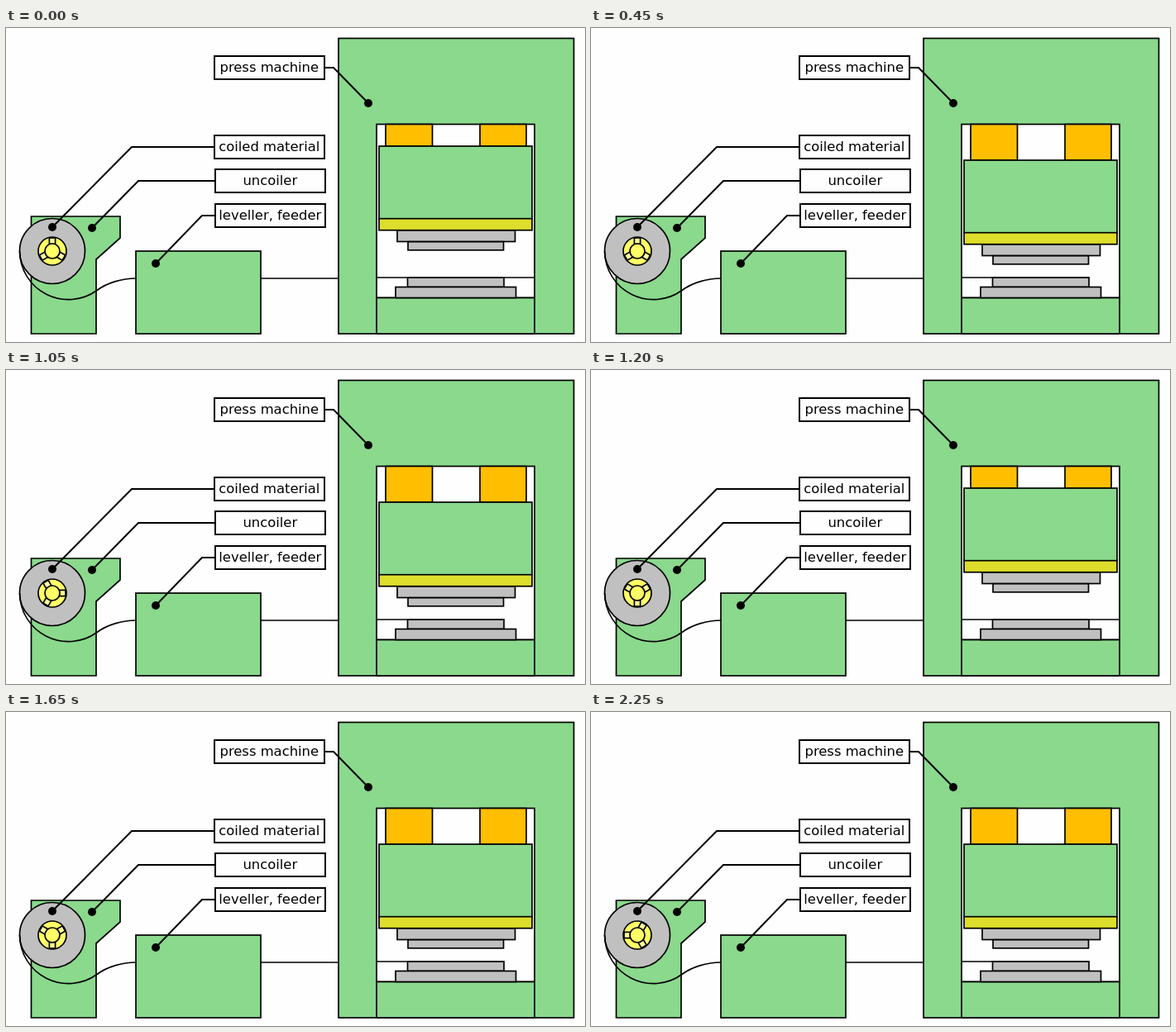
These frames come from a looping animation (700x380 px, 2.4 s). An HTML page:

```html
<!DOCTYPE html>
<html lang="en">
<head>
<meta charset="utf-8">
<title>Press line</title>
<style>
  html, body { margin: 0; width: 100%; height: 100%; overflow: hidden; background: #fefefe; }
  svg { display: block; width: 700px; height: 380px; }
  .part { stroke: #000; stroke-width: 1.7; }
  .green { fill: #8ad98c; }
  .grey { fill: #c0c0c0; }
  .orange { fill: #ffbf00; }
  .olive { fill: #dddd2c; }
  .yellow { fill: #ffff66; }
  .pale { fill: #ffff99; }
  .white { fill: #fefefe; }
  .strip { fill: none; stroke: #000; stroke-width: 1.6; }
  .lead { fill: none; stroke: #000; stroke-width: 2; }
  .label { fill: #fefefe; stroke: #000; stroke-width: 2; }
  text { font: 16.4px "DejaVu Sans", Verdana, sans-serif; text-anchor: middle; fill: #000; }
</style>
</head>
<body>
<svg viewBox="0 0 700 380">
  <!-- uncoiler and coil -->
  <path class="part green" d="M30.5 228H138V254L109 280V370H30.5Z"/>
  <circle class="part grey" cx="56" cy="270" r="39.5"/>
  <g transform="translate(56 270)">
    <circle class="part yellow" r="17"/>
    <g id="hub"></g>
    <circle class="part yellow" r="9"/>
  </g>
  <path class="strip" d="M16.5 270A59 59 0 0 0 110 317.5C122 308.5 140 303 157 303M308 303H402"/>
  <rect class="part green" x="157" y="270" width="151" height="100"/>

  <!-- press frame -->
  <rect class="part green" x="402" y="12.5" width="284.5" height="357.5"/>
  <rect class="part white" x="448" y="116.5" width="191" height="210"/>
  <rect class="part green" x="448" y="326.5" width="191" height="43.5"/>
  <rect class="part grey" x="485.5" y="302" width="116.5" height="11.5"/>
  <rect class="part grey" x="471" y="313.5" width="145.5" height="13"/>
  <path class="strip" id="strip"/>

  <!-- moving ram -->
  <rect class="part orange rod" x="459" y="116.5" width="56.5"/>
  <rect class="part orange rod" x="573" y="116.5" width="56"/>
  <g id="ram">
    <rect class="part green" x="451" y="143" width="185" height="88"/>
    <rect class="part olive" x="451" y="230.7" width="185" height="14"/>
    <rect class="part grey" x="473" y="245" width="142.5" height="13.5"/>
    <rect class="part grey" x="486" y="258.7" width="115.5" height="10.1"/>
  </g>
  <g id="notes"></g>
</svg>
<script>
  const STEP = 150;
  const DROP = [0, 17, 33, 17];
  const $ = id => document.getElementById(id);
  const rods = document.querySelectorAll('.rod');

  $('hub').innerHTML = [0, 120, 240].map(a =>
    `<rect class="part pale" x="-3.6" y="-16" width="7.2" height="7.5" transform="rotate(${a})"/>`).join('');

  // box left, box top, leader bend x, dot x, dot y, text
  const notes = [
    [252, 34, 396, 438, 91, 'press machine'],
    [252, 130, 152, 56, 241, 'coiled material'],
    [253, 171, 160, 104, 242, 'uncoiler'],
    [253, 213, 237, 181, 285, 'leveller, feeder']
  ];
  $('notes').innerHTML = notes.map(([x, y, bend, px, py, text]) => {
    const start = bend > x ? x + 133 : x;
    return `<path class="lead" d="M${start} ${y + 14}H${bend}L${px} ${py}"/>
      <circle cx="${px}" cy="${py}" r="5"/>
      <rect class="label" x="${x}" y="${y}" width="133" height="28"/>
      <text x="${x + 66.3}" y="${y + 19.3}">${text}</text>`;
  }).join('');

  function draw(ms) {
    const step = Math.floor(ms / STEP) % 16;
    const phase = step % 4;
    const drop = DROP[phase];
    $('ram').setAttribute('transform', `translate(0 ${drop})`);
    rods.forEach(r => r.setAttribute('height', 26.5 + drop));
    // the strip is cut off at the die once the stroke is done
    $('strip').setAttribute('d', `M448 302H${phase === 3 ? 602 : 639}`);
    $('hub').setAttribute('transform', `rotate(${90 * Math.floor(step / 4)})`);
  }

  let t0;
  function tick(now) {
    if (t0 === undefined) t0 = now;
    draw(Math.max(0, now - t0));
    requestAnimationFrame(tick);
  }
  draw(0);
  requestAnimationFrame(tick);
</script>
</body>
</html>
```
